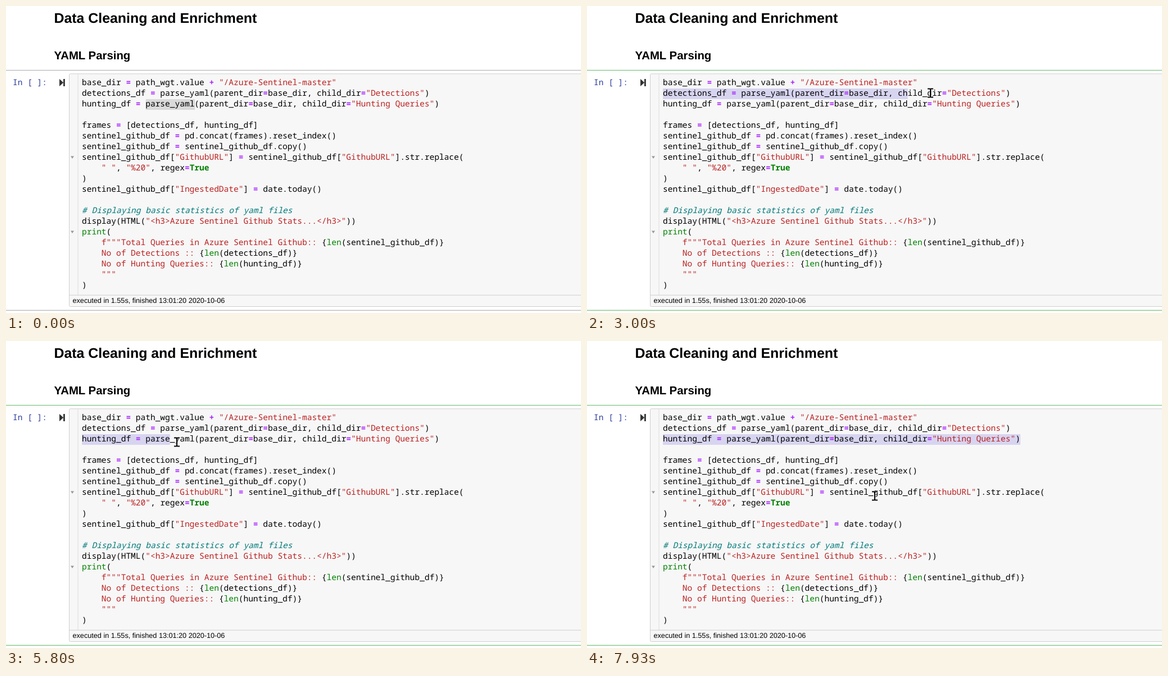
An HTML page for the animation above (8000 ms loop, 1023 by 547 pixels).

```html
<!DOCTYPE html>
<html lang="en">
<head>
<meta charset="utf-8">
<title>Notebook cell</title>
<style>
  html, body { margin: 0; width: 100%; height: 100%; overflow: hidden; background: #fff; }
  svg { display: block; width: 1023px; height: 547px; }
  text { white-space: pre; text-rendering: geometricPrecision; }
  .sans { font-family: "Liberation Sans", Arial, sans-serif; fill: #000; }
  .head { font-weight: bold; }
  .mono { font: 14.52px "Noto Sans Mono", "DejaVu Sans Mono", monospace; fill: #000; }
  .op { fill: #a2f; font-weight: bold; }
  .str { fill: #ba2121; }
  .fn { fill: #008000; }
  .kw { fill: #008000; font-weight: bold; }
  .note { fill: #007979; font-style: italic; }
</style>
</head>
<body>
<svg viewBox="0 0 1023 547" xmlns="http://www.w3.org/2000/svg">
  <text class="sans head" x="85.5" y="30" font-size="24.89">Data Cleaning and Enrichment</text>
  <text class="sans head" x="85.5" y="95" font-size="20.37">YAML Parsing</text>

  <g id="edge">
    <rect y="114" width="1023" height="1"/>
    <rect y="541.7" width="1023" height="1.1"/>
  </g>
  <rect x="112.5" y="120.8" width="920" height="414.7" rx="2" fill="#f7f7f7" stroke="#cfcfcf"/>
  <path d="M113 515.2H1023" stroke="#cfcfcf"/>
  <path d="M128 121.5V515" stroke="#ddd"/>
  <path d="M115 267.5h6l-3 4.5zM115 400.5h6l-3 4.5z" fill="#999"/>
  <path d="M95 130l7.2 6.5L95 143zM102 130h2.8v13H102z" fill="#333"/>

  <rect id="word" x="248.8" y="166" width="87.2" height="19" fill="#d9d9d9"/>
  <rect id="selection" x="135" height="19" fill="#d7d4f0"/>
  <text class="mono" x="12" y="141" style="fill:#303f9f">In [ ]:</text>
  <g id="code"></g>
  <text class="sans" x="118.5" y="529" font-size="12.67">executed in 1.55s, finished 13:01:20 2020-10-06</text>

  <rect id="caret" width="1" height="18"/>
  <g id="pointer" fill="none">
    <path d="M-5 -7.5H5M0 -7.5V7.5M-5 7.5H5" stroke="#fff" stroke-opacity=".75" stroke-width="3.4"/>
    <path d="M-5 -7.5H-1L0 -6.5L1 -7.5H5M0 -7V7M-5 7.5H-1L0 6.5L1 7.5H5" stroke="#000" stroke-width="2"/>
  </g>
</svg>
<script>
const LOOP = 8000, TICKS_PER_MS = 15 / 1000;
const LEFT = 135, TOP = 128, CHAR = 8.712, LINE = 19, WIDTH = 1023;
const $ = id => document.getElementById(id);

const source = `base_dir = path_wgt.value + "/Azure-Sentinel-master"
detections_df = parse_yaml(parent_dir=base_dir, child_dir="Detections")
hunting_df = parse_yaml(parent_dir=base_dir, child_dir="Hunting Queries")

frames = [detections_df, hunting_df]
sentinel_github_df = pd.concat(frames).reset_index()
sentinel_github_df = sentinel_github_df.copy()
sentinel_github_df["GithubURL"] = sentinel_github_df["GithubURL"].str.replace(
    " ", "%20", regex=True
)
sentinel_github_df["IngestedDate"] = date.today()

# Displaying basic statistics of yaml files
display(HTML("<h3>Azure Sentinel Github Stats...</h3>"))
print(
    f"""Total Queries in Azure Sentinel Github:: {len(sentinel_github_df)}
    No of Detections :: {len(detections_df)}
    No of Hunting Queries:: {len(hunting_df)}
    """
)`.split("\n");

const escape = s => s.replace(/&/g, "&amp;").replace(/</g, "&lt;");
const span = (cls, s) => `<tspan class="${cls}">${escape(s)}</tspan>`;

const token = /(?<note>#.*)|(?<str>"[^"]*")|\b(?<kw>True)\b|\b(?<fn>print|len)\b|(?<op>[=+])|\w+|[^#"=+\w]+/g;

function paintCode(s) {
  return s.replace(token, (all, ...rest) => {
    const groups = rest.at(-1);
    const cls = Object.keys(groups).find(name => groups[name]);
    return cls ? span(cls, all) : escape(all);
  });
}

// Inside the triple-quoted block only the braces hold code.
const paintBlock = s => s.split(/(\{.*?\})/)
  .map(part => part[0] === "{" ? paintCode(part) : span("str", part)).join("");

let inBlock = false;
$("code").innerHTML = source.map((s, i) => {
  const quotes = s.includes('"""');
  const html = inBlock || quotes ? paintBlock(s) : paintCode(s);
  if (quotes) inBlock = !inBlock;
  return `<text class="mono" xml:space="preserve" x="${LEFT}" y="${TOP + 13 + i * LINE}">${html}</text>`;
}).join("");

// Hand movements; the pointer rests between them.
const start = { x: 1023, y: 547 };
const moves = [
  { from: 3, to: 12, x: 449, y: 347 },
  { from: 15, to: 20, x: 230, y: 210 },
  { from: 20, to: 28, x: 198, y: 176 },
  { from: 28, to: 34, x: 135, y: 157 },
  { from: 36, to: 37, x: 141, y: 157 },
  { from: 37, to: 49, x: 723, y: 155 },
  { from: 49, to: 54, x: 759, y: 155 },
  { from: 57, to: 58, x: 732, y: 157 },
  { from: 58, to: 70, x: 151, y: 185 },
  { from: 70, to: 74, x: 141, y: 175 },
  { from: 80, to: 87, x: 304, y: 180 },
  { from: 87, to: 96, x: 635, y: 195 },
  { from: 100, to: 102, x: 686, y: 179 },
  { from: 102, to: 107, x: 781, y: 180 },
  { from: 115, to: 119, x: 512, y: 276 }
];
const drags = [{ row: 1, from: 37, to: 55 }, { row: 2, from: 81, to: 108 }];
const FOCUS = 28, CARET_HOME = 34;

const easeOut = k => 1 - (1 - k) ** 1.5;
const clamp = (v, lo, hi) => Math.max(lo, Math.min(hi, v));

function pointerAt(tick) {
  let { x, y } = start;
  for (const m of moves) {
    const k = easeOut(clamp((tick - m.from) / (m.to - m.from), 0, 1));
    x += (m.x - x) * k;
    y += (m.y - y) * k;
  }
  return { x, y };
}

// The selection follows the pointer one tick late and snaps to characters.
function selectionAt(tick) {
  const drag = drags.findLast(d => tick >= d.from);
  if (!drag) return { row: 0, width: 0 };
  const { row } = drag;
  const { x, y } = pointerAt(Math.min(tick, drag.to) - 1);
  if (y > TOP + 3 * LINE) return { row, width: WIDTH - LEFT };
  const chars = Math.round((x - LEFT) / CHAR);
  return { row, width: CHAR * clamp(chars, 0, source[row].length) };
}

function place(el, attrs) {
  for (const name in attrs) el.setAttribute(name, attrs[name]);
}
const show = (el, on) => { el.style.display = on ? "" : "none"; };

function draw(now) {
  // Source times are rounded to 10 ms, hence the small lead.
  const tick = Math.floor((now % LOOP + 4) * TICKS_PER_MS) % (LOOP * TICKS_PER_MS);
  const active = tick >= FOCUS, home = tick >= CARET_HOME;

  place($("edge"), { fill: active ? "#66bb6a" : "#ababab" });
  show($("word"), !active);

  const { row, width } = selectionAt(tick);
  place($("selection"), { y: TOP + row * LINE, width });

  place($("caret"), { x: home ? LEFT : LEFT + 7 * CHAR, y: TOP + (home ? 1 : 2) * LINE });
  show($("caret"), active && tick <= drags[0].from && width === 0);

  const { x, y } = pointerAt(tick);
  place($("pointer"), { transform: `translate(${Math.round(x)} ${Math.round(y)})` });
  show($("pointer"), tick > moves[0].from);
}

function loop() {
  draw(performance.now());
  requestAnimationFrame(loop);
}
loop();
</script>
</body>
</html>
```
